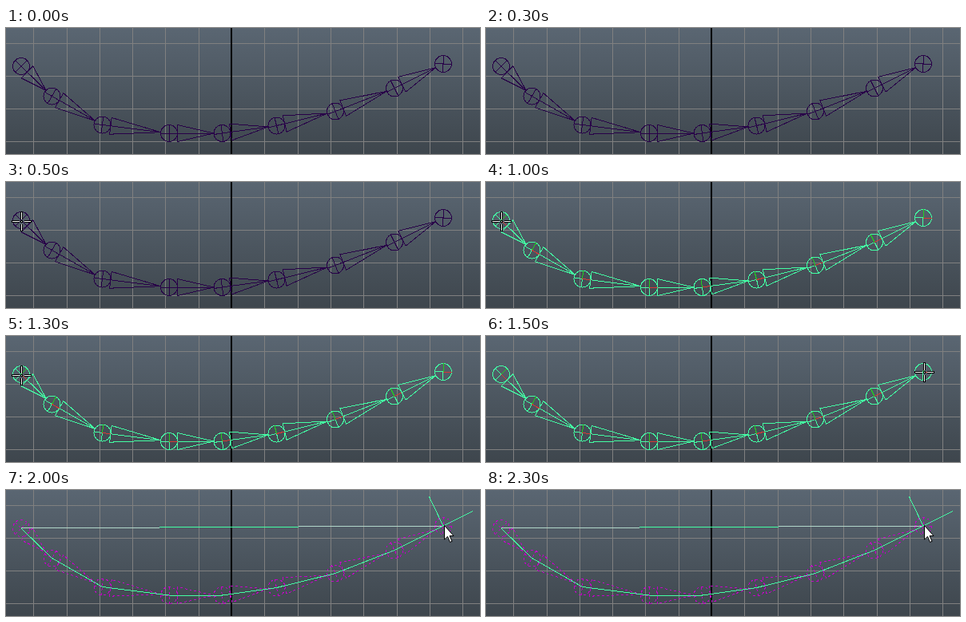
An HTML page for the animation above (2500 ms loop, 593 by 158 pixels).

```html
<!DOCTYPE html>
<html lang="en">
<head>
<meta charset="utf-8">
<title>Spline IK on a joint chain</title>
<style>
  html, body { margin: 0; width: 100%; height: 100%; overflow: hidden; }
  svg { display: block; width: 593px; height: 158px; background: linear-gradient(#5a6672, #3e464d); }
  svg { fill: none; shape-rendering: crispEdges; }
  .step { opacity: 0; stroke: currentColor; animation: 2.5s step-end infinite; }
  #idle { color: #280048; animation-name: idle; }
  #selected { color: #43ffa3; animation-name: selected; }
  #bound { color: #c400c8; stroke-dasharray: 3 3; animation-name: bound; }
  #handle { color: #43ffa3; animation-name: bound; }
  #pickRoot { animation-name: pickRoot; }
  #pickEnd { animation-name: pickEnd; }
  @keyframes idle { 0% { opacity: 1 } 40%, 100% { opacity: 0 } }
  @keyframes selected { 0% { opacity: 0 } 40% { opacity: 1 } 80%, 100% { opacity: 0 } }
  @keyframes bound { 0% { opacity: 0 } 80%, 100% { opacity: 1 } }
  @keyframes pickRoot { 0% { opacity: 0 } 20% { opacity: 1 } 60%, 100% { opacity: 0 } }
  @keyframes pickEnd { 0% { opacity: 0 } 60% { opacity: 1 } 80%, 100% { opacity: 0 } }
</style>
</head>
<body>
<svg viewBox="0 0 593 158">
  <defs>
    <g id="cross">
      <path d="M-12.5 0H-3M3 0H12.5M0-12.5V-3M0 3V12.5" stroke="#000" stroke-width="3"/>
      <path d="M-11.5 0H-3M3 0H11.5M0-11.5V-3M0 3V11.5" stroke="#fff"/>
      <path d="M-1.5 0H1.5" stroke="#000" stroke-width="3"/>
      <path d="M-.5 0H.5" stroke="#fff"/>
    </g>
  </defs>
  <path id="grid" stroke="#808080"/>
  <path d="M282 0V158" stroke="#000" stroke-width="2"/>
  <g id="idle" class="step"></g>
  <g id="selected" class="step"></g>
  <g id="bound" class="step"></g>
  <g id="handle" class="step">
    <path d="M19 47.5H192M366 45.5H546" stroke="#b2d8ca"/>
    <path d="M192 46.5H366M529.5 8.5L547 45L584 26.5"/>
    <path id="curve"/>
    <path d="M548.5 44.5V62L552.5 58.3L555.5 65.5L558 64.3L555 57.5H560Z"
          fill="#fff" stroke="#000" shape-rendering="auto"/>
  </g>
  <g id="pickRoot" class="step"><use href="#cross" x="19.5" y="49.5"/></g>
  <g id="pickEnd" class="step"><use href="#cross" x="548.5" y="45.5"/></g>
</svg>
<script>
  const R = 10.5;
  const joints = [[19, 48], [57.5, 85.5], [120.5, 121.5], [204, 132], [270.5, 132],
                  [338.5, 122.5], [412, 104.5], [486, 75.5], [547, 45]];
  const el = id => document.getElementById(id);

  // Point at local offset (x, y) in a frame rotated by angle a
  const at = ([px, py], a, x, y) =>
    `${(px + x * Math.cos(a) - y * Math.sin(a)).toFixed(1)} ${(py + x * Math.sin(a) + y * Math.cos(a)).toFixed(1)}`;
  const line = (p, a, x1, y1, x2, y2) => `M${at(p, a, x1, y1)}L${at(p, a, x2, y2)}`;

  let rings = '', bones = '', axes = '', xAxes = '', yAxes = '';
  joints.forEach((p, i) => {
    const next = joints[i + 1];
    const a = next ? Math.atan2(next[1] - p[1], next[0] - p[0]) : 0.09;
    rings += `<circle cx="${p[0]}" cy="${p[1]}" r="${R}"/>`;
    axes += line(p, a, -R, 0, R, 0) + line(p, a, 0, -R, 0, R);
    xAxes += line(p, a, 0, 0, R, 0);
    yAxes += line(p, a, 0, 0, 0, -R);
    if (next) {
      const tip = Math.hypot(next[0] - p[0], next[1] - p[1]) - R;
      bones += `M${at(p, a, R, -R)}L${at(p, a, R, R)}L${at(p, a, tip, 0)}Z` + line(p, a, R, 0, tip, 0);
    }
  });

  const chain = rings + `<path d="${bones}${axes}"/>`;
  el('idle').innerHTML = el('bound').innerHTML = chain;
  el('selected').innerHTML = rings + `<path d="${bones}"/><path d="${axes}"/>` +
    `<path d="${xAxes}" stroke="#d83a35"/><path d="${yAxes}" stroke="#20d020"/>`;
  el('curve').setAttribute('d', 'M' + joints.map(p => p.join(' ')).join('L'));

  let grid = '';
  for (let i = -6; i <= 7; i++) grid += `M${Math.round(282 + i * 41.3) + .5} 0V158`;
  for (let i = 0; i < 4; i++) grid += `M0 ${19.5 + i * 41}H593`;
  el('grid').setAttribute('d', grid);
</script>
</body>
</html>
```
